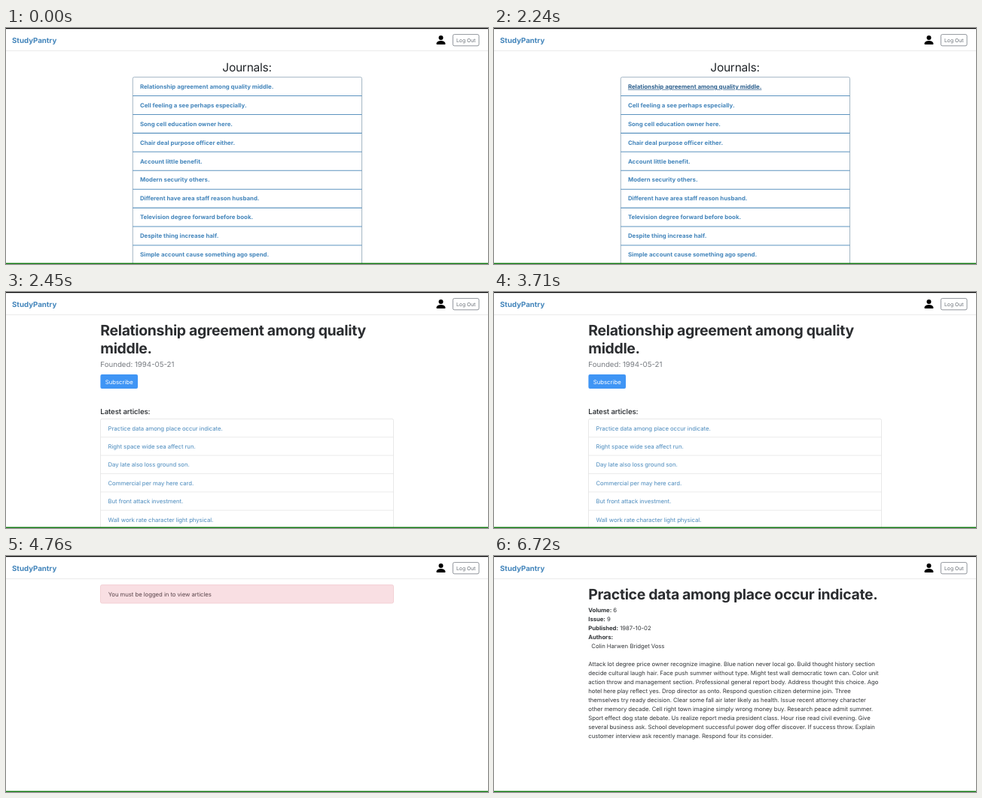
Animation of 640 by 315 pixels, one loop 7910 ms. Source, as an HTML page:

```html
<!DOCTYPE html>
<html lang="en">
<head>
<meta charset="utf-8">
<title>StudyPantry</title>
<style>
html, body { margin: 0; width: 100%; height: 100%; overflow: hidden; background: #fff; }
svg { display: block; width: 640px; height: 315px; }
text {
  font: 7.75px Inter, "Open Sans", sans-serif; letter-spacing: -.05px;
  fill: #333639; text-rendering: geometricPrecision; white-space: pre;
}
.b { font-weight: 700; }
.brand { font-size: 9.7px; font-weight: 700; letter-spacing: 0; fill: #4385bb; }
.small { font-size: 6.8px; letter-spacing: 0; fill: #666d74; }
.h1 { font-size: 19.4px; font-weight: 700; letter-spacing: -.32px; fill: #2b2d30; }
.h2 { font-size: 15.5px; letter-spacing: -.25px; fill: #212529; }
.h5 { font-size: 9.7px; font-weight: 500; letter-spacing: -.12px; fill: #212529; }
.lead { font-size: 9.7px; letter-spacing: 0; fill: #777b80; }
.link { fill: #4a8abd; }
.link.b { font-size: 7.8px; letter-spacing: .02px; fill: #4385bb; }
.link.hover { fill: #2d608e; text-decoration: underline; }
.white { letter-spacing: 0; fill: #fff; }
.alert { fill: #5a464c; }
</style>
</head>
<body>
<svg id="stage" viewBox="0 0 640 315"></svg>
<script>
const LOOP = 7910, LEFT = 125.3;

const journals = [
  'Relationship agreement among quality middle.', 'Cell feeling a see perhaps especially.',
  'Song cell education owner here.', 'Chair deal purpose officer either.',
  'Account little benefit.', 'Modern security others.',
  'Different have area staff reason husband.', 'Television degree forward before book.',
  'Despite thing increase half.', 'Simple account cause something ago spend.'
];
const articles = [
  'Practice data among place occur indicate.', 'Right space wide sea affect run.',
  'Day late also loss ground son.', 'Commercial per may here card.',
  'But front attack investment.', 'Wall work rate character light physical.'
];
const body = [
  'Attack lot degree price owner recognize imagine. Blue nation never local go. Build thought history section',
  'decide cultural laugh hair. Face push summer without type. Might test wall democratic town can. Color unit',
  'action throw and management section. Professional general report body. Address thought this choice. Ago',
  'hotel here play reflect yes. Drop director as onto. Respond question citizen determine join. Three',
  'themselves try ready decision. Clear some fall air later likely as health. Issue recent attorney character',
  'other memory decade. Cell right town imagine simply wrong money buy. Research peace admit summer.',
  'Sport effect dog state debate. Us realize report media president class. Hour rise read civil evening. Give',
  'several business ask. School development successful power dog offer discover. If success throw. Explain',
  'customer interview ask recently manage. Respond four its consider.'
];

const text = (x, y, s, cls = '', extra = '') => `<text x="${x}" y="${y}" class="${cls}" ${extra}>${s}</text>`;
const box = (x, y, w, h, fill, stroke = 'none', r = 2, sw = .8) =>
  `<rect x="${x}" y="${y}" width="${w}" height="${h}" rx="${r}" fill="${fill}" stroke="${stroke}" stroke-width="${sw}"/>`;
const rule = (x, y, w, color, sw) => `<path d="M${x} ${y}h${w}" stroke="${color}" stroke-width="${sw}"/>`;
const page = (id, content) => `<g id="${id}">${content}</g>`;
const field = (y, name, value) => text(LEFT, y, `<tspan class="b">${name}:</tspan> ${value}`);

const header =
  rule(0, 30.3, 640, '#e4e4e4', .8) + text(8, 19.6, 'StudyPantry', 'brand') +
  '<path transform="translate(569.5 8)" d="M3 14s-1 0-1-1 1-4 6-4 6 3 6 4-1 1-1 1zM8 8a3 3 0 1 0 0-6 3 3 0 0 0 0 6"/>' +
  box(593.4, 8.6, 34.6, 15.2, '#fff', '#757c83') +
  text(610.7, 18.9, 'Log Out', 'small', 'text-anchor="middle"');

const listPage = text(320, 57.8, 'Journals:', 'h2', 'text-anchor="middle"') +
  box(168.3, 65.6, 304.2, 260, '#fff', '#8fa5b6') +
  journals.map((s, i) =>
    (i ? rule(168.3, 65.6 + i * 24.93, 304.2, '#5c93bf', 1.1) : '') +
    text(177.9, 80.8 + i * 24.93, s, 'link b')).join('');

const journalInfo = date =>
  text(LEFT, 99.6, 'Founded: ' + date, 'lead') +
  box(125.4, 110, 49.6, 19, '#3f95f5') +
  text(150.2, 122.7, 'Subscribe', 'white', 'text-anchor="middle"') +
  text(LEFT, 162.5, 'Latest articles:', 'h5');

const journalPage =
  text(LEFT, 58, 'Relationship agreement among quality', 'h1') + text(LEFT, 82, 'middle.', 'h1') +
  journalInfo('1994-05-21') + box(125.5, 169.4, 389, 160, '#fff', '#e2e2e2') +
  articles.map((s, i) =>
    (i ? rule(125.5, 169.3 + i * 24.4, 389, '#e2e2e2', .7) : '') +
    text(135.5, 184.6 + i * 24.4, s, 'link')).join('');

const alertPage = box(125.5, 38.6, 389, 24.4, '#f9dfe3', '#f0cace') +
  text(135.7, 53.8, 'You must be logged in to view articles', 'alert');

const articlePage = text(LEFT, 58, articles[0], 'h1') +
  field(75.3, 'Volume', 6) + field(87.3, 'Issue', 9) +
  field(99.3, 'Published', '1987-10-02') + field(111.3, 'Authors', '') +
  text(129.3, 123.3, 'Colin Harwen') + text(180.5, 123.3, 'Bridget Voss') +
  body.map((s, i) => text(LEFT, 147 + i * 12, s)).join('');

const stage = document.getElementById('stage');
stage.innerHTML = header +
  page('list', listPage) +
  page('loading', `<g transform="translate(0 -46)">${journalInfo('')}</g>`) +
  page('journal', journalPage) + page('alert', alertPage) + page('article', articlePage) +
  box(0, 0, 640, 1.2, '#000', 'none', 0) + box(0, 313.6, 640, 1.4, '#117a11', 'none', 0);

// Start time of each page
const starts = { list: 0, loading: 2310, journal: 2450, alert: 4620, article: 4900 };
const firstLink = id => stage.querySelector(`#${id} .link`);
const journalLink = firstLink('list'), articleLink = firstLink('journal');
const within = (t, a, b) => t >= a && t < b;

function draw(now) {
  const t = now % LOOP;
  const current = Object.keys(starts).filter(id => t >= starts[id]).pop();
  for (const id in starts)
    document.getElementById(id).style.display = id === current ? '' : 'none';
  journalLink.classList.toggle('hover', t >= 1680);
  articleLink.classList.toggle('hover', within(t, 3360, 3710) || t >= 4200);
}

const begin = performance.now();
function tick() {
  draw(performance.now() - begin);
  requestAnimationFrame(tick);
}
tick();
</script>
</body>
</html>
```
